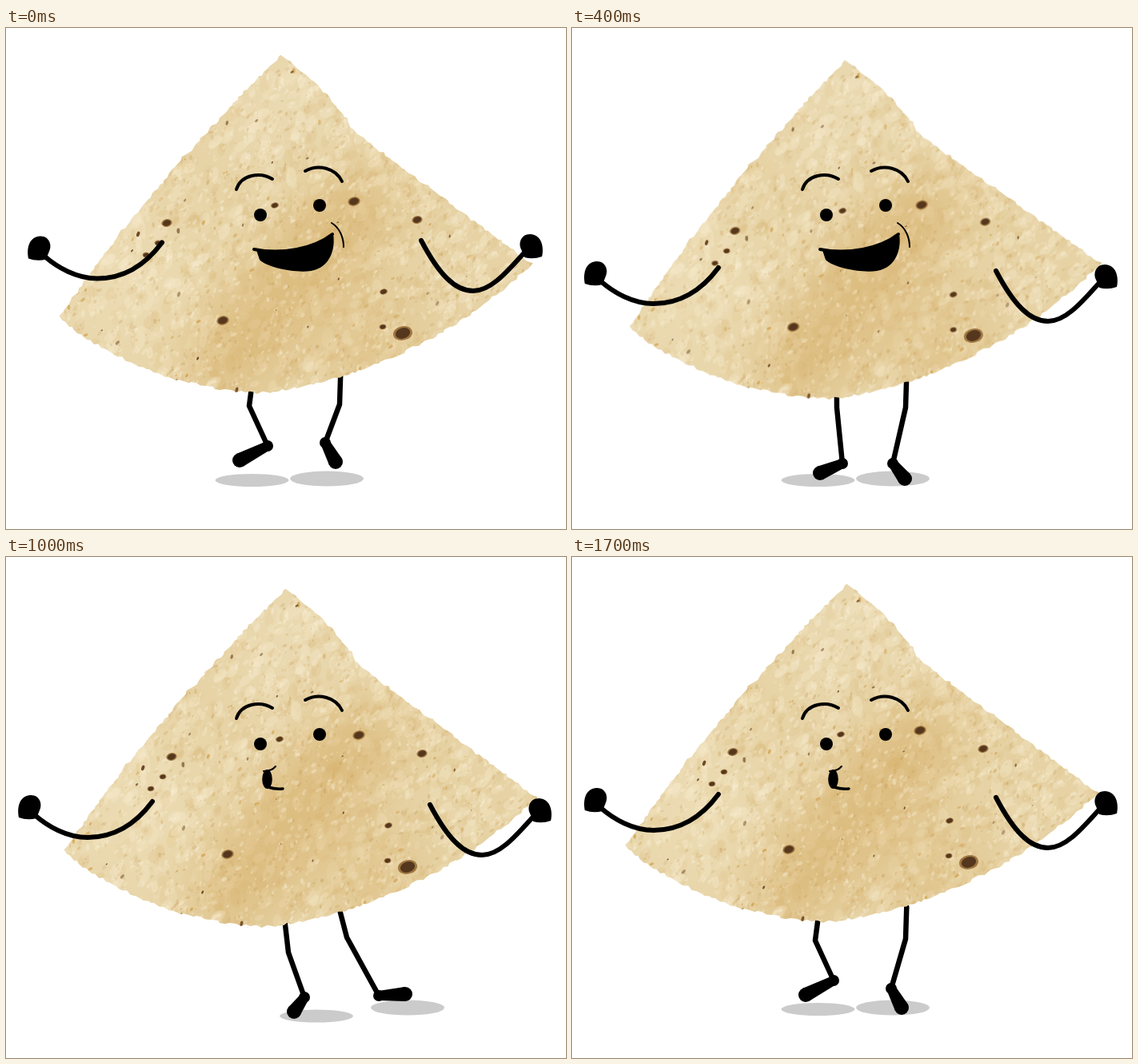
Recreate the animation shown at these times as an HTML page with a canvas. Size 700 by 627 pixels, loop 1.8 s.

```html
<!DOCTYPE html>
<html>
<head>
<meta charset="utf-8">
<style>
  html, body { margin: 0; width: 100%; height: 100%; overflow: hidden; background: #fff; }
  canvas { display: block; }
</style>
</head>
<body>
<canvas id="stage" width="700" height="627"></canvas>
<script>
const W = 700, H = 627, STEP = 100, STEPS = 18, BEAT = 6;
const ctx = document.getElementById('stage').getContext('2d');

let seed = 11;
const rand = () => (seed = (seed * 16807) % 2147483647) / 2147483647;
const spread = r => (rand() * 2 - 1) * r;
const mix = (a, b, t) => a + (b - a) * t;

function ellipse(c, x, y, rx, ry, angle, color) {
  c.fillStyle = color;
  c.beginPath();
  c.ellipse(x, y, rx, ry, angle, 0, Math.PI * 2);
  c.fill();
}

function glow(c, x, y, r, rgb, alpha) {
  const g = c.createRadialGradient(x, y, 0, x, y, r);
  g.addColorStop(0, `rgba(${rgb},${alpha})`);
  g.addColorStop(1, `rgba(${rgb},0)`);
  c.fillStyle = g;
  c.fillRect(x - r, y - r, r * 2, r * 2);
}

// Wedge made of quadratic curves (control, end), roughened along the way
function crumblyWedge() {
  const path = new Path2D();
  let x = 345, y = 34;
  for (const [cx, cy, ex, ey] of [
    [188, 184, 66, 363], [170, 447, 315, 457], [507, 436, 657, 296], [548, 213, 435, 130], [412, 88, 345, 34]
  ]) {
    const n = Math.ceil(Math.hypot(ex - x, ey - y) / 5);
    for (let i = 0; i < n; i++) {
      const t = i / n;
      path.lineTo(mix(mix(x, cx, t), mix(cx, ex, t), t) + spread(1.7),
                  mix(mix(y, cy, t), mix(cy, ey, t), t) + spread(1.7));
    }
    [x, y] = [ex, ey];
  }
  path.closePath();
  return path;
}

function bakeChip() {
  const chip = document.createElement('canvas');
  chip.width = W;
  chip.height = H;
  const c = chip.getContext('2d');
  c.clip(crumblyWedge());
  c.fillStyle = '#e6d2a4';
  c.fillRect(0, 0, W, H);
  glow(c, 150, 320, 180, '240,226,190', .6);
  glow(c, 350, 90, 150, '236,221,184', .7);

  const scatter = (n, size, rgb, alpha) => {
    for (let i = 0; i < n; i++) {
      const x = 60 + rand() * 600, y = 30 + rand() * 430, r = size * (.4 + rand());
      ellipse(c, x, y, r, r * .55, 2.1 + spread(.7), `rgba(${rgb},${alpha * (.4 + rand() * .6)})`);
    }
  };
  scatter(800, 9, '207,167,96', .16);
  scatter(900, 9, '246,235,207', .38);
  // Toasted band from the cheek down to the lower left
  for (let t = 0; t <= 1; t += .2)
    glow(c, mix(440, 270, t), mix(225, 415, t), 95, '208,162,82', .27);
  glow(c, 450, 390, 110, '214,172,98', .3);
  scatter(1600, 3, '250,242,220', .38);
  scatter(1400, 2.5, '190,145,72', .28);
  scatter(110, 2.5, '200,140,40', .55);
  scatter(35, 2.5, '95,58,22', .9);

  for (const [x, y, r] of [
    [201, 244, 6], [190, 269, 4], [175, 284, 4], [336, 222, 4.5], [435, 217, 7], [514, 240, 6],
    [472, 330, 4.5], [471, 374, 4], [496, 382, 11], [271, 366, 7]
  ]) {
    ellipse(c, x, y, r * 1.1, r * .8, -.2, 'rgba(135,88,35,.75)');
    ellipse(c, x, y, r * .85, r * .6, -.3, '#54371d');
  }
  return chip;
}
const chip = bakeChip();

// Key poses. chip: x, y, rotation; drop: how low the arms hang; legs: knee, heel, toe
const LAND = { left: [304, 480, 327, 530, 292, 548], right: [417, 478, 399, 540, 412, 564] };
const GATHER = { left: [331, 475, 338, 545, 310, 557], right: [417, 475, 401, 545, 416, 564] };
const ASIDE = { left: [353, 495, 373, 551, 360, 569], right: [426, 476, 466, 549, 499, 547] };
const RETURN = { left: [342, 470, 358, 537, 338, 556], right: [423, 465, 418, 541, 420, 560] };
const TILTED = [-2.8, 14.5, -.023];
const KEYS = [
  { at: 0, chip: [0, 6, 0], drop: [0], ...LAND },
  { at: 1, chip: [0, 11, 0], drop: [0], ...LAND },
  { at: 4, chip: TILTED, drop: [3], ...GATHER },
  { at: 8, chip: TILTED, drop: [9], ...ASIDE },
  { at: 10, chip: [6, 6, 0], drop: [9], ...ASIDE },
  { at: 13, chip: [0, 0, 0], drop: [0], ...RETURN },
  { at: 17, chip: [0, 0, 0], drop: [0], ...LAND }
];

function poseAt(step) {
  const i = KEYS.findLastIndex(k => k.at <= step);
  const a = KEYS[i], b = KEYS[i + 1] || a;
  const t = (step - a.at) / (b.at - a.at || 1);
  return part => a[part].map((v, k) => mix(v, b[part][k], t));
}

function line(path, width) {
  ctx.lineWidth = width;
  ctx.stroke(new Path2D(path));
}

// The thigh leans back towards a fixed hip
function drawLeg([kx, ky, ax, ay, tx, ty], hip, pull, lift, kick) {
  ctx.save();
  ctx.translate(0, -lift);
  ay -= kick;
  ty -= kick;
  line(`M${mix(kx, hip, pull)} ${ky - 40}L${kx} ${ky}L${ax} ${ay}`, 6.5);
  ellipse(ctx, ax, ay, 7, 7, 0, '#000');
  ellipse(ctx, tx, ty, 9, 9, 0, '#000');
  const angle = Math.atan2(ty - ay, tx - ax), sx = -Math.sin(angle), sy = Math.cos(angle);
  ctx.beginPath();
  ctx.moveTo(ax + sx * 6, ay + sy * 6);
  ctx.lineTo(tx + sx * 9, ty + sy * 9);
  ctx.lineTo(tx - sx * 9, ty - sy * 9);
  ctx.lineTo(ax - sx * 6, ay - sy * 6);
  ctx.fill();
  ctx.restore();
}

function drawArm(dx, dy, arm, hand) {
  ctx.save();
  ctx.translate(dx, dy);
  line(arm, 6);
  ctx.fill(new Path2D(hand));
  ctx.restore();
}

function drawFace(smiling) {
  line('M288 202C294 183 318 180 333 189M374 179C390 170 412 175 420 192', 4);
  ellipse(ctx, 318, 234, 8, 8, 0, '#000');
  ellipse(ctx, 392, 222, 8, 8, 0, '#000');
  if (smiling) {
    line('M310 277C345 284 385 276 408 258', 4);
    ctx.fill(new Path2D('M313 278C345 283 385 276 409 258C412 275 406 300 381 304C360 307 325 299 317 290Q315 284 313 278'));
    line('M407 244C417 250 422 262 422 274', 2);
  } else {
    ellipse(ctx, 326.5, 278, 6.3, 12, 0, '#000');
    line('M322 268Q332 268 337 262', 2);
    line('M328 288Q336 291 346 290', 3.5);
  }
}

function draw(step) {
  const pose = poseAt(step);
  const hop = step % BEAT === 0 ? 1 : 0;
  ctx.fillStyle = '#fff';
  ctx.fillRect(0, 0, W, H);
  ctx.strokeStyle = '#000';
  ctx.lineCap = ctx.lineJoin = 'round';

  const aside = step > BEAT && step < 2 * BEAT;
  ellipse(ctx, aside ? 388 : 307.5, aside ? 574.5 : 566, 46, 8, 0, '#cbcbcb');
  ellipse(ctx, aside ? 502 : 401, 564, 46, 9.5, 0, '#cbcbcb');
  drawLeg(pose('left'), 330, .2, hop * 7, 0);
  drawLeg(pose('right'), 418, 1.3, hop * 7, hop * 14);

  const [x, y, angle] = pose('chip');
  ctx.save();
  ctx.translate(x, y - hop * 6);
  ctx.rotate(angle);
  ctx.drawImage(chip, 0, 0);
  ctx.restore();

  drawFace(step < STEPS / 2);

  const [drop] = pose('drop');
  drawArm(hop * 12, drop - hop * 28.5,
    'M183 297C160 328 132 342 102 342C76 342 52 328 36 314',
    'M16 317C13 303 18 289 31 289C42 289 46 300 42 308L38 318Q27 321 16 317');
  drawArm(hop * -11, drop - hop * 35,
    'M530 301C552 343 572 364 595 364C618 364 640 337 659 316',
    'M681 321C684 307 679 293 666 293C655 293 651 304 655 312L659 322Q670 325 681 321');
}

function tick() {
  draw(Math.floor(performance.now() / STEP) % STEPS);
  requestAnimationFrame(tick);
}
tick();
</script>
</body>
</html>
```
